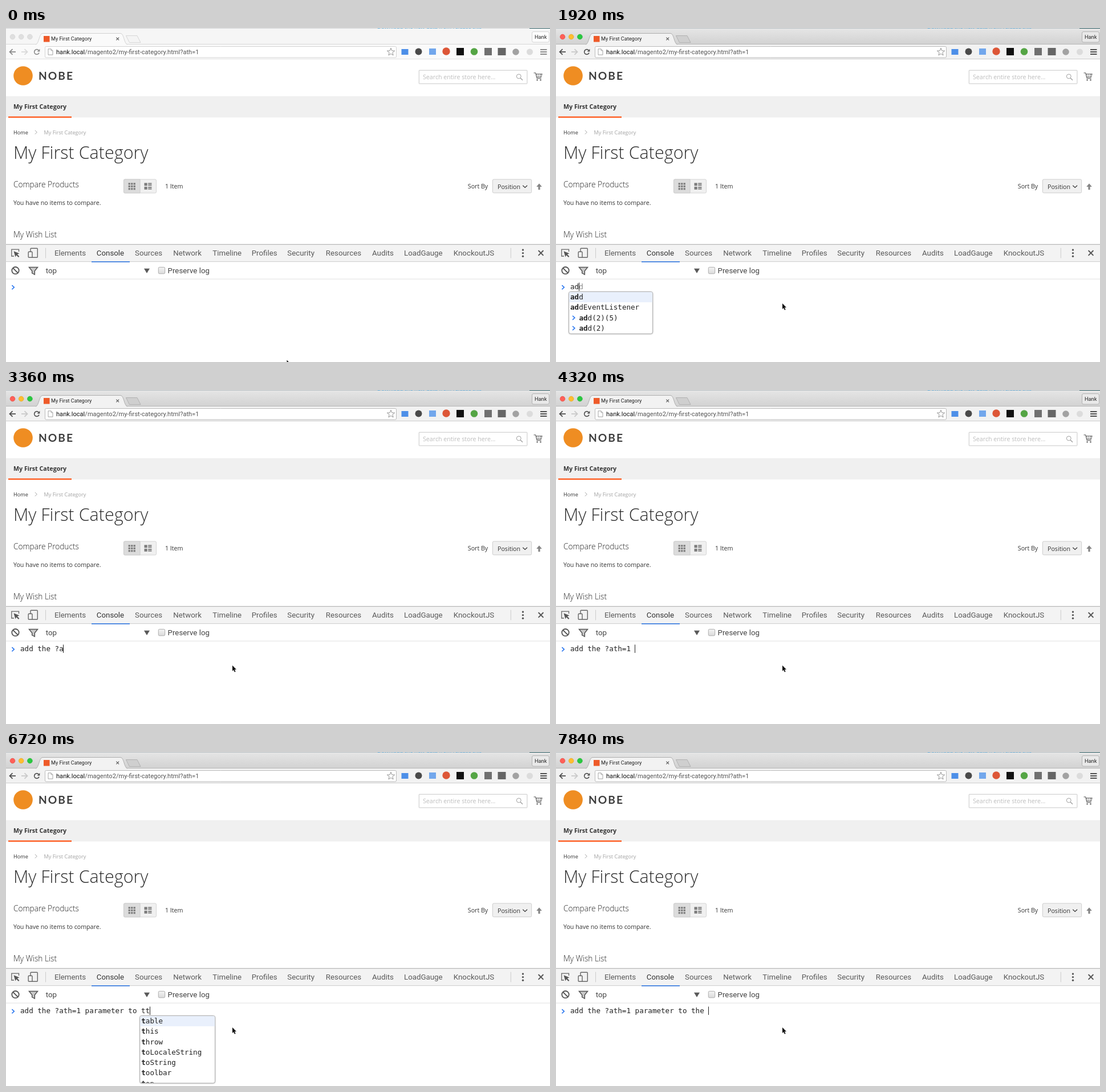
Animation, 954 px wide and 587 px high, one loop 8000 ms. Source, as an HTML page with a canvas:

```html
<!DOCTYPE html>
<html lang="en">
<head>
<meta charset="utf-8">
<title>Console typing</title>
<style>
  html, body { margin: 0; width: 100%; height: 100%; overflow: hidden; background: #fff; }
  canvas { display: block; width: 954px; height: 587px; }
</style>
</head>
<body>
<canvas id="stage"></canvas>
<script>
const W = 954, H = 587, LOOP = 8000;
const canvas = document.getElementById('stage');
const ctx = canvas.getContext('2d');
const dpr = window.devicePixelRatio || 1;
canvas.width = W * dpr;
canvas.height = H * dpr;

const UI = 'Roboto, sans-serif';
const PAGE = '"Open Sans", sans-serif';
const MONO = '"DejaVu Sans Mono", monospace';
const CHAR = 7.58, TEXT_X = 25, ROW = 18.27;

// Console states: start time, typed text, caret visible, popup, ghost text
const popup = (col, bold, items, history = []) => ({ col, bold, items, history });
const addHistory = ['add(2)(5)', 'add(2)'];
const aList = popup(0, 1, ['add', 'addEventListener', 'alert', 'applicationCache', 'arguments', 'atob', 'assert']);
const adList = popup(0, 2, ['add', 'addEventListener'], addHistory);
const addList = popup(0, 3, ['add', 'addEventListener'], addHistory);
const pList = popup(15, 1, ['parent', 'performance', 'personalbar', 'print', 'prompt']);
const tList = popup(28, 1, ['table', 'this', 'throw', 'toLocaleString', 'toString', 'toolbar', 'top']);
const thList = popup(28, 2, ['this', 'throw']);

const ASK = 'add the ?ath=1 ';
const TO = ASK + 'parameter to ';
const steps = [
  [0, '', false],
  [480, '', true],
  [960, 'a', true],
  [1120, 'a', true, aList, 'dd'],
  [1920, 'ad', true, adList, 'd'],
  [2080, 'add', true, addList],
  [2240, 'add t', true],
  [2400, 'add the ', true],
  [2880, 'add the ?', true],
  [3360, 'add the ?a', true],
  [3520, 'add the ?at', true],
  [3680, 'add the ?ath', true],
  [3840, 'add the ?ath=', true],
  [4000, 'add the ?ath=1', true],
  [4320, ASK, true],
  [4480, ASK + 'p', true, pList, 'arent'],
  [4640, ASK + 'p', true],
  [4960, ASK + 'pa', true],
  [5280, ASK + 'par', true],
  [5600, ASK + 'para', true],
  [5920, ASK + 'param', true],
  [6080, ASK + 'parame', true],
  [6240, ASK + 'paramete', true],
  [6400, TO, true],
  [6560, TO + 't', true, tList, 'able'],
  [6720, TO + 'tt', true, tList],
  [6880, TO + 'tt', true],
  [7200, TO + 't', true],
  [7360, TO + 't', true, tList, 'able'],
  [7680, TO + 'th', true, thList, 'is'],
  [7840, TO + 'the ', true]
];
const pointer = [[0, 492.5, 583.5], [160, 428, 519], [320, 397, 484]];
const at = (list, t) => list.filter(s => s[0] <= t).pop();

function text(s, x, y, size, color, family = UI, weight = 400) {
  ctx.font = `${weight} ${size}px ${family}`;
  ctx.fillStyle = color;
  ctx.fillText(s, x, y);
}
function rect(x, y, w, h, color) {
  ctx.fillStyle = color;
  ctx.fillRect(x, y, w, h);
}
function paint(fill, stroke, width = 1) {
  if (fill) { ctx.fillStyle = fill; ctx.fill(); }
  if (stroke) { ctx.strokeStyle = stroke; ctx.lineWidth = width; ctx.stroke(); }
}
function box(x, y, w, h, r, fill, stroke, width) {
  ctx.beginPath();
  ctx.roundRect(x, y, w, h, r);
  paint(fill, stroke, width);
}
function disc(x, y, r, fill, stroke, width) {
  ctx.beginPath();
  ctx.arc(x, y, r, 0, Math.PI * 2);
  paint(fill, stroke, width);
}
// Points are given flat: x, y, x, y, ...
function poly(points, fill, stroke, width, closed = !!fill) {
  ctx.beginPath();
  for (let i = 0; i < points.length; i += 2) ctx.lineTo(points[i], points[i + 1]);
  if (closed) ctx.closePath();
  paint(fill, stroke, width);
}
function cross(x, y, r, color, width) {
  poly([x - r, y - r, x + r, y + r], null, color, width);
  poly([x + r, y - r, x - r, y + r], null, color, width);
}
function gradient(y0, y1, a, b) {
  const g = ctx.createLinearGradient(0, y0, 0, y1);
  g.addColorStop(0, a);
  g.addColorStop(1, b);
  return g;
}

function drawTabStrip(active) {
  rect(0, 0, W, 29, active ? gradient(0, 28, '#e6e6e6', '#d2d2d2') : '#f6f6f6');
  rect(0, 0, W, 1, active ? '#b9c1c4' : '#d3d6d7');
  text('Download the new data from release site', 651, 0.8, 9.6, '#3a9bd6', PAGE);
  rect(918, 0, 36, 1, '#2a5a60');

  const lights = active ? ['#ff5f57', '#ffbd2e', '#28c940'] : ['#dfdfdf', '#dfdfdf', '#dfdfdf'];
  const rims = active ? ['#e2463f', '#e0a028', '#1aab29'] : ['#d0d0d0', '#d0d0d0', '#d0d0d0'];
  lights.forEach((c, i) => disc(11.5 + i * 15.2, 15.5, 4.4, c, rims[i], 0.6));

  const edge = active ? '#a9a9a9' : '#cfcfcf';
  const bar = active ? '#f2f2f2' : '#fafafa';
  rect(0, 28, W, 27, bar);
  rect(0, 28, W, 0.8, edge);
  ctx.beginPath();
  ctx.moveTo(52, 29);
  ctx.bezierCurveTo(58, 28, 58, 9.5, 64, 9.5);
  ctx.lineTo(201, 9.5);
  ctx.bezierCurveTo(207, 9.5, 207, 28, 213, 29);
  paint(bar, edge, 0.9);
  rect(54, 28.4, 157, 1.6, bar);
  poly([210.5, 13.5, 230, 13.5, 236, 25.5, 216.5, 25.5], active ? '#cfcfcf' : '#f4f4f4', edge, 0.8);

  rect(66, 14, 10.5, 10.5, '#ee5a29');
  text('My First Category', 79, 22.3, 9.15, '#222');
  cross(195.7, 19, 2.4, '#555', 1.1);
  box(922.5, 6.5, 30, 18.5, 2.5, active ? '#e9e9e9' : '#fdfdfd', active ? '#adadad' : '#d0d0d0', 0.9);
  text('Hank', 927, 19.3, 9.2, '#222');
}

function drawToolbar(active) {
  const ink = active ? '#505050' : '#8c8c8c';
  const faint = active ? '#c9c9c9' : '#dadada';
  const arrow = (x, dir, color) => {
    poly([x - 5 * dir, 42, x + 5.5 * dir, 42], null, color, 1.8);
    poly([x, 37.2, x - 5 * dir, 42, x, 46.8], null, color, 1.8);
  };
  arrow(11.5, 1, ink);
  arrow(32.5, -1, faint);
  ctx.beginPath();
  ctx.arc(54, 42, 4.3, 0.4, Math.PI * 1.75);
  paint(null, ink, 1.7);
  poly([59.3, 36.8, 59.3, 41.5, 54.6, 41.5], ink);

  box(68.5, 32.5, 616, 19.5, 2, '#fff', active ? '#b4b4b4' : '#cecece', 0.9);
  poly([74, 36.8, 79, 36.8, 82, 39.8, 82, 47.2, 74, 47.2], '#fff', '#999', 0.9);
  poly([79, 36.8, 79, 39.8, 82, 39.8], null, '#999', 0.8);
  const host = 'hank.local';
  text(host, 88, 45.7, 11.08, '#111');
  const hostWidth = ctx.measureText(host).width;
  text('/magento2/my-first-category.html?ath=1', 88 + hostWidth, 45.7, 11.08, '#555');

  const star = [];
  for (let i = 0; i < 10; i++) {
    const a = i * Math.PI / 5 - Math.PI / 2, r = i % 2 ? 3 : 7;
    star.push(675 + r * Math.cos(a), 42.3 + r * Math.sin(a));
  }
  poly(star, '#fff', '#8a8a8a', 0.9);

  rect(693.5, 37, 12, 10, '#4d8fe8');
  disc(723.5, 41.5, 6, '#4a4a4a');
  rect(742, 36, 12, 11, '#72a7ec');
  disc(772, 41, 6.7, '#dd5637');
  rect(790, 35, 13, 13, '#111');
  disc(821, 41.5, 6.3, '#55a545');
  rect(839, 35, 13, 13, '#707070');
  rect(862.5, 35, 14, 13, '#666');
  disc(894, 42, 5.8, '#a2a2a2');
  disc(918.5, 42, 5.5, '#dcdcdc');
  for (let i = 0; i < 3; i++) rect(937, 37 + i * 4, 11.5, 2, ink);
  rect(0, 54, W, 0.8, active ? '#c4c4c4' : '#dcdcdc');
}

function drawPage() {
  rect(0, 55, W, 325, '#fff');
  disc(30, 84, 16.8, '#ef8d22');
  ctx.letterSpacing = '2px';
  text('NOBE', 57, 91, 19.2, '#3d3d3d', 'Lato, sans-serif', 700);
  ctx.letterSpacing = '0px';

  box(724.3, 74.3, 189.6, 23.6, 0.5, '#fff', '#c2c2c2', 0.9);
  text('Search entire store here...', 731, 90.2, 10.67, '#bdbdbd', PAGE);
  disc(899.3, 85, 3.9, null, '#a0a0a0', 1);
  poly([902.2, 88, 906, 91.8], null, '#a0a0a0', 1.4);

  poly([925.5, 78.8, 928.6, 78.8, 931.2, 88.5, 938.6, 88.5], null, '#777', 1.3);
  poly([929.2, 80.7, 940.3, 80.7, 938.5, 86.6, 930.8, 86.6], '#a5a5a5', '#777', 0.9);
  for (const x of [932.5, 935.4]) poly([x, 81, x + 0.3, 86.4], null, '#fff', 0.9);
  poly([930, 83.6, 939.6, 83.6], null, '#fff', 0.8);
  disc(931.6, 91.4, 1.3, '#777');
  disc(937.5, 91.4, 1.3, '#777');

  rect(0, 119.7, W, 37.6, '#f0f0f0');
  rect(4, 155.5, 111, 2.2, '#ff5010');
  text('My First Category', 13, 141.8, 10.67, '#333', PAGE, 700);

  text('Home', 13, 186.5, 9.15, '#333', PAGE);
  poly([51, 179.8, 54.2, 183.2, 51, 186.6], null, '#999', 0.9);
  text('My First Category', 66.5, 186.5, 9.15, '#a3a3a3', PAGE);
  text('My First Category', 13, 230, 30.5, '#2b2b2b', PAGE, 300);

  text('Compare Products', 13, 280.4, 13.7, '#222', PAGE, 300);
  text('You have no items to compare.', 13, 311.3, 10.67, '#333', PAGE);
  text('My Wish List', 13, 368, 13.7, '#222', PAGE, 300);

  box(206.5, 266, 57, 24, 2, '#f0f0f0', '#d1d1d1', 0.9);
  box(206.5, 266, 28.6, 24, [2, 0, 0, 2], '#dcdcdc', '#cacaca', 0.9);
  for (let row = 0; row < 3; row++) {
    const y = 272.2 + row * 4.5;
    for (let col = 0; col < 3; col++) rect(214.6 + col * 4.5, y, 3.3, 3.2, '#7d7d7d');
  }
  for (let row = 0; row < 2; row++) {
    const y = 272.3 + row * 6.6;
    rect(242.5, y, 5.2, 5, '#7d7d7d');
    for (const dy of [0, 2.8]) rect(249.2, y + dy, 6.3, 2, '#7d7d7d');
  }
  text('1 Item', 279, 281.9, 10.67, '#333', PAGE);
  text('Sort By', 809.8, 281.9, 10.67, '#333', PAGE);
  box(853.4, 266, 68.2, 23.8, 2, '#f0f0f0', '#c9c9c9', 0.9);
  text('Position', 862, 282.5, 10.67, '#333', PAGE);
  poly([906.3, 276.8, 910.2, 280.4, 914.1, 276.8], null, '#333', 1.2);
  poly([935, 273.3, 939.8, 279, 936.6, 279, 936.6, 284.2, 933.4, 284.2, 933.4, 279, 930.2, 279], '#858585');
}

const tabs = [['Elements', 85], ['Console', 158.8], ['Sources', 226], ['Network', 293.3], ['Timeline', 362.3],
  ['Profiles', 430.7], ['Security', 493.3], ['Resources', 560.8], ['Audits', 642], ['LoadGauge', 698], ['KnockoutJS', 784.8]];

function drawDevTools() {
  rect(0, 380, W, H - 380, '#fff');
  rect(0, 380, W, 31, '#f3f3f3');
  rect(0, 379.8, W, 1, '#a8a8a8');
  rect(0, 410.2, W, 0.9, '#cacaca');
  rect(150, 410, 67, 1.7, '#3b7de0');
  rect(0, 440.7, W, 0.9, '#dcdcdc');
  for (const [name, x] of tabs) text(name, x, 399.7, 13.3, name === 'Console' ? '#333' : '#5a5a5a');
  for (const x of [69, 884.8]) rect(x, 386.5, 1, 18, '#cccccc');

  poly([14, 401, 9.8, 401, 9.8, 389.2, 22.5, 389.2, 22.5, 393], null, '#666', 1.3);
  poly([13.5, 392.3, 23.5, 396.3, 19.8, 397.7, 23.4, 401.5, 21.8, 403, 18.2, 399.3, 16.5, 402.6], '#555');
  box(43, 387.3, 12.3, 16, 1, '#f3f3f3', '#666', 1.4);
  box(39.2, 393.3, 6.8, 10, 1, '#f3f3f3', '#666', 1.4);
  for (let i = 0; i < 3; i++) disc(906.5, 390 + i * 5.6, 1.7, '#555');
  cross(938, 395.4, 4.4, '#555', 1.9);

  disc(16.5, 426.2, 6.2, null, '#555', 1.8);
  poly([12.2, 421.9, 20.8, 430.5], null, '#555', 1.8);
  poly([40.5, 420.4, 55.5, 420.4, 50.3, 427, 50.3, 433.3, 45.7, 430.8, 45.7, 427], '#c9c9c9', '#555', 1.5);
  text('top', 69.8, 430.9, 13.3, '#444');
  poly([242, 422.7, 252, 422.7, 247, 431], '#5a5a5a');
  box(267.3, 420.4, 11.4, 11.4, 2, gradient(420, 432, '#f4f4f4', '#dadada'), '#a5a5a5', 0.9);
  text('Preserve log', 283.6, 430.9, 13.3, '#444');
}

const chevron = (x, y) => poly([x, y - 3.6, x + 3.9, y, x, y + 3.6], null, '#2f7af0', 1.6);

function drawPopup(p) {
  const rows = p.items.concat(p.history);
  const longest = Math.max(...p.items.map(s => s.length));
  const x = TEXT_X + p.col * CHAR;
  const w = longest * CHAR + 26, h = Math.min(rows.length * ROW + 1, 118.6);
  ctx.save();
  ctx.shadowColor = 'rgba(0,0,0,.18)';
  ctx.shadowBlur = 2;
  ctx.shadowOffsetY = 0.5;
  box(x - 2.6, 463.4, w, h, 3.5, '#fff', '#a9a9a9', 0.9);
  ctx.restore();
  ctx.save();
  ctx.beginPath();
  ctx.roundRect(x - 2.1, 463.9, w - 1, h - 1, 3);
  ctx.clip();
  rect(x - 2.6, 463.4, w, ROW + 0.3, '#e9f0fc');
  rows.forEach((s, i) => {
    const y = 477 + i * ROW, old = i >= p.items.length;
    const tx = old ? x + 15.4 : x;
    if (old) chevron(x + 4, y - 4.2);
    text(s.slice(0, p.bold), tx, y, 12.58, '#222', MONO, 700);
    text(s.slice(p.bold), tx + p.bold * CHAR, y, 12.58, '#222', MONO);
  });
  ctx.restore();
}

function drawConsole([, typed, caret, list, ghost]) {
  chevron(10.4, 455.8);
  const end = TEXT_X + typed.length * CHAR;
  text(typed, TEXT_X, 459, 12.58, '#222', MONO);
  if (ghost) text(ghost, end, 459, 12.58, '#8a8a8a', MONO);
  if (caret) rect(Math.floor(end), 447.5, 1, 14.5, '#222');
  if (list) drawPopup(list);
}

function drawPointer([, x, y]) {
  ctx.save();
  ctx.translate(x, y);
  ctx.lineJoin = 'round';
  const shape = [0, 0, 0, 10, 2.2, 8, 3.9, 11.8, 5.6, 11, 4, 7.3, 7, 7.3];
  poly(shape, '#fff', '#fff', 1.8);
  poly(shape, '#111');
  ctx.restore();
}

function draw(now) {
  const t = now % LOOP, active = t >= 320;
  ctx.setTransform(dpr, 0, 0, dpr, 0, 0);
  drawTabStrip(active);
  drawToolbar(active);
  drawPage();
  drawDevTools();
  drawConsole(at(steps, t));
  drawPointer(at(pointer, t));
}

const start = performance.now();
function tick() {
  draw(performance.now() - start);
  requestAnimationFrame(tick);
}
tick();
</script>
</body>
</html>
```
